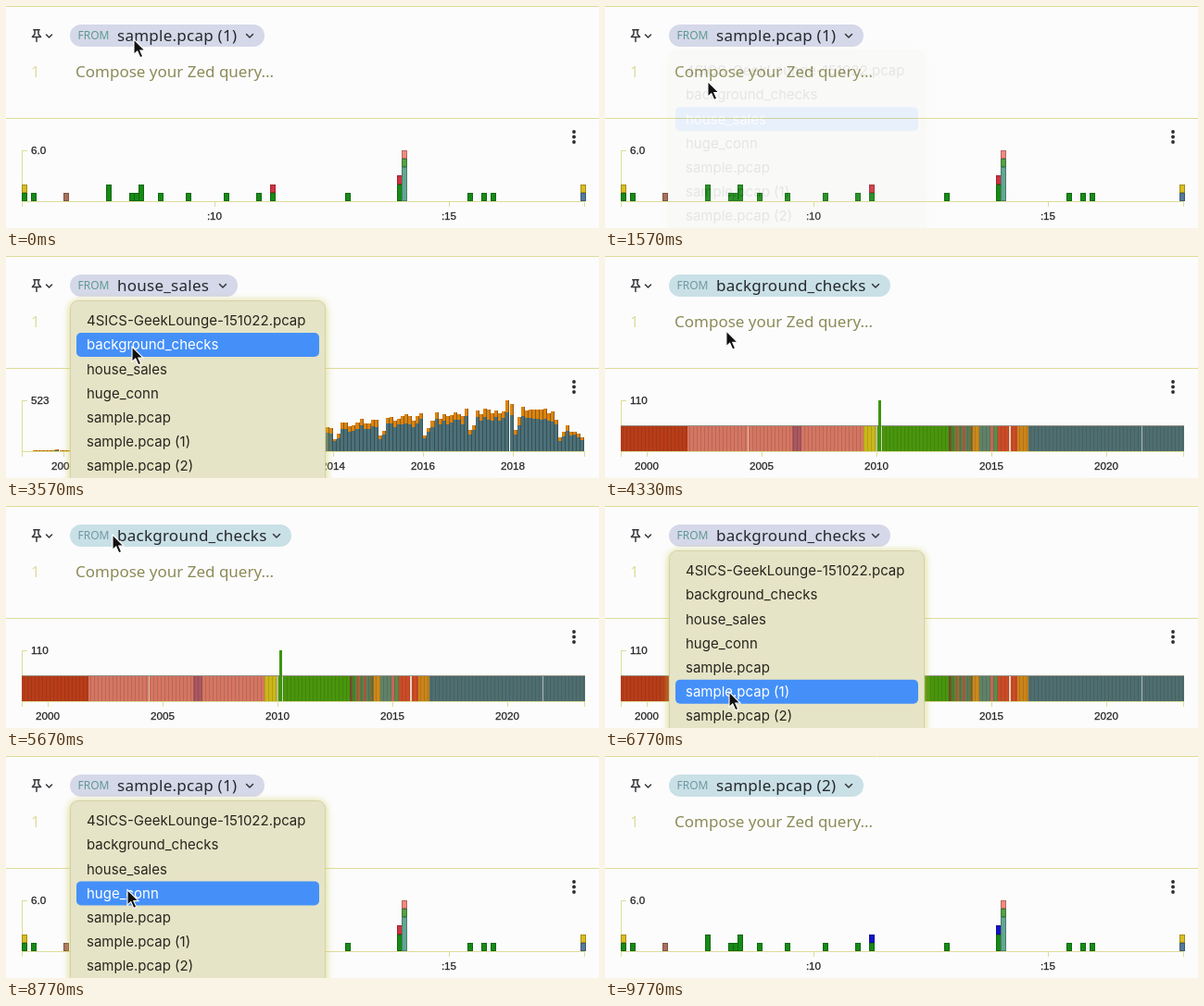
Recreate the animation shown at these times as an HTML page. Size 640 px wide and 240 px high, loop 9810 ms.

```html
<!DOCTYPE html>
<html lang="en">
<head>
<meta charset="utf-8">
<title>Pool switcher</title>
<style>
  html, body { margin: 0; width: 100%; height: 100%; overflow: hidden; background: #fcfcfd; }
  svg { display: block; width: 640px; height: 240px; }
  .code { font: 17px "Noto Sans", sans-serif; white-space: pre; }
  .name { letter-spacing: .25px; fill: #25282c; }
  .from { font: 500 12px "Noto Sans", sans-serif; }
  .menu { font: 15px Inter, sans-serif; }
  .axis { font: 11.7px "Liberation Sans", Arial, sans-serif; fill: #222; stroke: #222; stroke-width: .25; }
  .rule { stroke: #dcdc98; fill: none; shape-rendering: crispEdges; }
  .bars { shape-rendering: crispEdges; }
  .icon { fill: none; stroke: #34363a; stroke-width: 1.5; stroke-linecap: round; stroke-linejoin: round; }
  #menu { filter: drop-shadow(0 1px 4px rgba(205, 200, 70, .75)); }
</style>
</head>
<body>
<svg id="stage" viewBox="0 0 640 240">
  <path class="rule" d="M0 .5H640M0 121.5H640"/>
  <path class="icon" d="M29.8 25.8h6.4M31 26v4.6l-2.6 2.9h9.2L35 30.6V26M33 33.5v5"/>
  <path class="icon" d="M43.5 31l3 3 3-3"/>
  <g id="pill">
    <rect id="pillBox" x="69" y="20" height="24" rx="12"/>
    <text id="from" class="from" x="77.5" y="36">FROM</text>
    <text id="name" class="code name" x="120" y="38"></text>
    <path id="chevron" class="icon" d="M-3.5 30.5l3.5 3.5 3.5-3.5"/>
  </g>
  <text class="code" x="27" y="77" fill="#dedd9f">1</text>
  <text class="code" x="75" y="77" fill="#8c8b57">Compose your Zed query...</text>
  <g fill="#2c2e30">
    <circle cx="613" cy="136" r="1.9"/><circle cx="613" cy="141.5" r="1.9"/><circle cx="613" cy="147" r="1.9"/>
  </g>
  <g id="charts"></g>
  <g id="menu">
    <rect x="69.5" y="48.5" width="275" height="220" rx="8" fill="#e6e4c6" stroke="#d3d1ac"/>
    <rect id="mark" x="76" width="262" height="26" rx="5" fill="#4590f8"/>
    <g id="rows" class="menu"></g>
  </g>
  <path id="cursor" d="M0 0V16.5L3.8 13l3 6.8 2.9-1.3-2.9-6.5h5.2z" fill="#111" stroke="#fff" stroke-width="1.1"/>
</svg>
<script>
const LOOP = 9810, BASE = 211, ROW = 26.2, FIRST_ROW = 69.8;
const $ = id => document.getElementById(id);

function add(parent, tag, attrs, text) {
  const el = document.createElementNS("http://www.w3.org/2000/svg", tag);
  for (const k in attrs) el.setAttribute(k, attrs[k]);
  if (text) el.textContent = text;
  parent.append(el);
  return el;
}

function lerpKeys(keys, x, col, ease = u => u) {
  let i = 0;
  while (i < keys.length - 2 && keys[i + 1][0] <= x) i++;
  const [a, b] = [keys[i], keys[i + 1]];
  const u = Math.min(1, Math.max(0, (x - a[0]) / (b[0] - a[0])));
  return a[col] + (b[col] - a[col]) * ease(u);
}

// Charts
function makeChart(max, ticks) {
  const g = add($("charts"), "g", {});
  add(g, "path", { class: "rule", d: "M23 156.5H17.5V217M17 211.5H624.5V217" });
  add(g, "text", { class: "axis", x: 27, y: 160 }, max);
  for (const [x, label] of ticks) {
    add(g, "path", { class: "rule", d: `M${x + .5} 211V217` });
    add(g, "text", { class: "axis", x, y: 231, "text-anchor": "middle" }, label);
  }
  return [g, add(g, "g", { class: "bars" })];
}

function bar(g, x, w, y, h, fill, edge) {
  add(g, "rect", { x, y, width: w, height: h, fill });
  if (edge) add(g, "rect", { x: x + .5, y: y + .5, width: w - 1, height: h - 1, fill: "none", stroke: "#000", "stroke-opacity": edge });
}

function packetChart(accent) {
  const [g, bars] = makeChart("6.0", [[225, ":10"], [478, ":15"]]);
  const colors = { g: "#168a16", y: "#d9bd20", b: "#a9705c", a: accent, s: "#55799a", t: "#62a692", o: "#55a045", p: "#f08a80" };
  const stacks = [
    [17, "gy"], [27, "g"], [62, "b"], [108, "gg"], [133, "g"], [138, "g"], [143, "gg"], [164, "g"],
    [194, "g"], [235, "g"], [270, "g"], [285, "ga"], [366, "g"], [422, "gga"], [427, "ttttop"],
    [498, "g"], [513, "g"], [523, "g"], [620, "sy"]
  ];
  for (const [x, stack] of stacks) {
    // Merge equal neighbours into one block
    let n = 0;
    for (const run of stack.match(/(.)\1*/g)) {
      const bottom = Math.round(BASE - n * 9.17);
      n += run.length;
      const top = Math.round(BASE - n * 9.17);
      bar(bars, x, 6, top, bottom - top, colors[run[0]], .25);
    }
  }
  return g;
}

function salesChart() {
  const [g, bars] = makeChart("523", [[62, "2008"], [159, "2010"], [256, "2012"], [353, "2014"], [450, "2016"], [547, "2018"]]);
  const trend = [[17, 0], [36, 1], [70, 2], [150, 6], [240, 14], [345, 25], [400, 34], [475, 38], [540, 47], [585, 41], [600, 28], [625, 11]];
  let seed = 7;
  const rand = () => (seed = seed * 16807 % 2147483647) / 2147483647;
  for (let i = 0; i < 150; i++) {
    const x = 17 + i * 4.05, month = (i + 1) % 12;
    const dip = month === 0 ? .5 : month === 1 ? .72 : 1;
    const peak = i === 129 ? 55 : 0;
    const h = Math.round(peak || lerpKeys(trend, x, 1) * dip * (.9 + rand() * .24));
    if (h < 1) continue;
    const cap = Math.min(h, Math.max(1, Math.round(h * (.15 + rand() * .1))));
    const left = Math.round(x), w = Math.round(x + 4.05) - left;
    bar(bars, left, w, BASE - h, h, "#4b7078");
    bar(bars, left, w, BASE - h, cap, "#dc8410");
    bar(bars, left + w - 1, 1, BASE - h, h, "rgba(30,35,35,.42)");
  }
  return g;
}

function checksChart() {
  const [g, bars] = makeChart("110", [[45, "2000"], [169, "2005"], [293, "2010"], [417, "2015"], [541, "2020"]]);
  const bands = [
    [17, "#b93c18"], [89, "#d57662"], [154, "#e4c3b4"], [155, "#d57662"], [202, "#a9575f"], [212, "#d57662"],
    [279, "#cab719"], [292, "#b7bd92"], [294, "#48960c"], [371, "#75512b"], [374, "#468a2f"], [378, "#a36636"],
    [382, "#587e49"], [386, "#b05a3f"], [389, "#52815c"], [393, "#7a6d38"], [397, "#cc8919"], [404, "#608268"],
    [416, "#c96455"], [419, "#62884e"], [424, "#cc4b27"], [436, "#ead2bd"], [438, "#cc4b27"], [445, "#ca8418"],
    [457, "#4e6e70"], [579, "#cbd3d1"], [580, "#4e6e70"], [625]
  ];
  for (let i = 0; i < bands.length - 1; i++) {
    const [x, fill] = bands[i];
    bar(bars, x, bands[i + 1][0] - x, 184, 27, fill);
  }
  for (let x = 19; x < 625; x += 4) bar(bars, x, 1, 184, 27, "rgba(40,35,30,.16)");
  bar(bars, 17, 608, 183, 1, "rgba(70,60,40,.55)");
  bar(bars, 295, 3, 156, 55, "#3f9310");
  bar(bars, 298, 1, 184, 27, "#cfdcb7");
  return g;
}

const sampleOne = packetChart("#cf3340"), sampleTwo = packetChart("#1414c8");
const sales = salesChart(), checks = checksChart();
const charts = [sampleOne, sales, checks, sampleTwo];

// Menu
const files = ["4SICS-GeekLounge-151022.pcap", "background_checks", "house_sales", "huge_conn", "sample.pcap", "sample.pcap (1)", "sample.pcap (2)"];
const rows = files.map((f, i) => add($("rows"), "text", { x: 87, y: FIRST_ROW + i * ROW + 5.3 }, f));

// Timeline: start, label, pill right edge, pill colour, FROM colour, chart
const lavender = "#d5d8e9", aqua = "#c9e0e6", teal = "#5f9a91", steel = "#7298a3";
const pools = [
  [0, "sample.pcap (1)", 279, lavender, teal, sampleOne],
  [1700, "house_sales", 250, lavender, teal, sales],
  [4080, "background_checks", 308, aqua, steel, checks],
  [6000, "background_checks", 308, lavender, teal, checks],
  [7350, "sample.pcap (1)", 279, lavender, teal, sampleOne],
  [9500, "sample.pcap (2)", 279, aqua, steel, sampleTwo]
];
const opened = [[500, 1400], [2600, 3800], [5900, 7080], [8200, 9230]];
const FADE = 190;
const path = [
  [0, 138, 36], [600, 138, 37], [1150, 118, 122], [1420, 116, 122], [1720, 106, 42], [2000, 122, 35],
  [2750, 124, 36], [3450, 136, 98], [4100, 136, 98], [4800, 116, 32], [5670, 115, 31], [6000, 115, 31],
  [6700, 134, 201], [7150, 134, 201], [7850, 128, 36], [8330, 128, 37], [8750, 131, 144], [8820, 131, 147],
  [9080, 133, 226], [9270, 134, 226], [9740, 286, -17], [9810, 288, -24]
];
const smooth = u => u * u * (3 - 2 * u);

function render(t) {
  const [, label, right, fill, ink, chart] = pools.findLast(p => p[0] <= t);
  $("pillBox").setAttribute("width", right - 69);
  $("pillBox").setAttribute("fill", fill);
  $("from").setAttribute("fill", ink);
  $("name").textContent = label;
  $("chevron").setAttribute("transform", `translate(${right - 16} 0)`);
  for (const c of charts) c.style.display = c === chart ? "" : "none";

  const span = opened.find(([a, b]) => t >= a && t < b + FADE);
  $("menu").style.display = span ? "" : "none";
  const x = lerpKeys(path, t, 1, smooth), y = lerpKeys(path, t, 2, smooth);
  if (span) {
    $("menu").style.opacity = t < span[1] ? 1 : 1 - (t - span[1]) / FADE;
    const hoverY = lerpKeys(path, Math.min(t, span[1]), 2, smooth);
    const row = Math.min(files.length - 1, Math.floor((hoverY - FIRST_ROW) / ROW + .5));
    $("mark").style.display = row < 0 ? "none" : "";
    $("mark").setAttribute("y", FIRST_ROW + row * ROW - 13);
    rows.forEach((r, i) => r.setAttribute("fill", i === row ? "#fff" : "#26261f"));
  }
  $("cursor").setAttribute("transform", `translate(${x.toFixed(2)} ${y.toFixed(2)})`);
}

function tick() {
  render((performance.now() - start) % LOOP);
  requestAnimationFrame(tick);
}
const start = performance.now();
tick();
</script>
</body>
</html>
```
